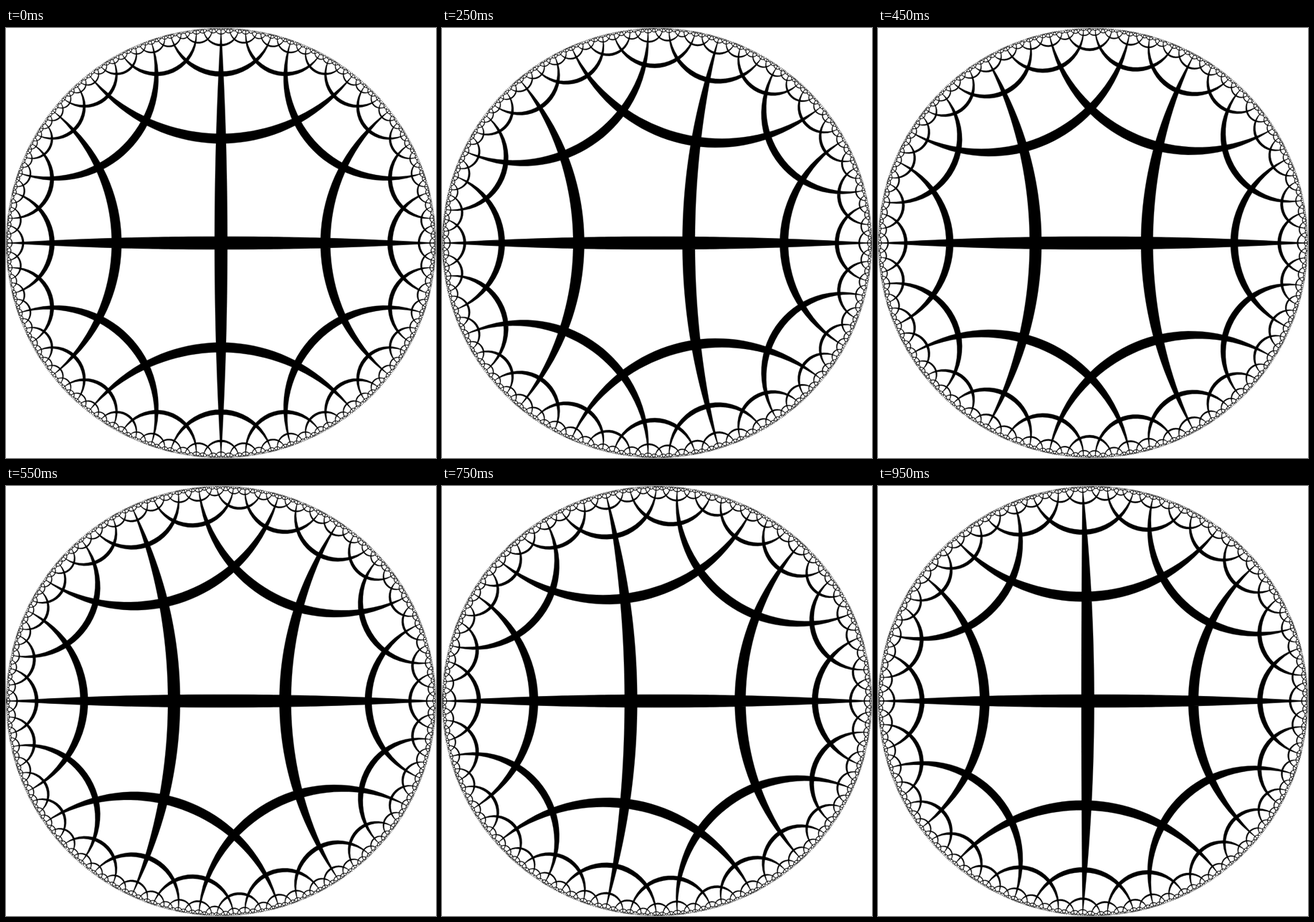
Recreate the animation shown at these times as an HTML page with a canvas. Size 600 by 600 pixels, loop 1 s.

```html
<!DOCTYPE html>
<html>
<head>
<meta charset="utf-8">
<style>
  html, body { margin: 0; width: 100%; height: 100%; overflow: hidden; background: #fff; }
  canvas { display: block; }
</style>
</head>
<body>
<canvas id="disk" width="600" height="600"></canvas>
<script>
// Order-4 pentagonal tiling in the Poincaré disk, sliding by one edge per loop.
// Each line is held as its Minkowski normal [x, y, t].
const ctx = document.getElementById('disk').getContext('2d');
const R = 300, STEP = 50, STEPS = 20;
const HALF = 0.059;        // sinh of the half line width
const MAX_T = 200;         // skips arcs smaller than 1.5 px
const h = Math.acosh(Math.cos(Math.PI / 5) * Math.SQRT2);  // half an edge
const vertex = Math.tanh(h);

const dot = (a, b) => a[0] * b[0] + a[1] * b[1] - a[2] * b[2];

function tilingLines() {
  const a = Math.SQRT1_2, c = a / vertex, b = Math.hypot(a, c);
  const sides = [
    [0, -1, 0],
    [Math.cosh(h), 0, Math.sinh(h)], [-Math.cosh(h), 0, Math.sinh(h)],
    [a, b, c], [-a, b, c]
  ];
  const seen = new Set(), lines = [];
  const add = n => {
    const key = n.map(v => Math.round(v * 1000)).join();
    if (n[2] < -1e-6 || n[2] > MAX_T * 1.75 || seen.has(key)) return;
    seen.add(key);
    lines.push(n);
  };
  sides.forEach(add);
  for (let i = 0; i < lines.length; i++) {
    const n = lines[i];
    for (const s of sides) {
      const k = 2 * dot(n, s);
      add(n.map((v, j) => v - k * s[j]));
    }
  }
  return lines;
}

// Outline of the band of constant hyperbolic width around a line
function band(x, y, t) {
  const m = Math.hypot(x, y), grow = Math.sqrt(1 + HALF * HALF) / m;
  const count = 4 * Math.ceil(6 + 30 / (1 + Math.abs(t)));
  for (let i = 0; i < count; i++) {
    const angle = 2 * Math.PI * i / count;
    const sin = Math.sin(angle), cos = Math.cos(angle), off = HALF * cos;
    const w = grow * m * m + off * t + Math.abs(cos);
    const px = (grow * (x * t - y * sin) + off * x) / w;
    const py = (grow * (y * t + x * sin) + off * y) / w;
    if (i) ctx.lineTo(px * R, py * R);
    else ctx.moveTo(px * R, py * R);
  }
  ctx.closePath();
}

const lines = tilingLines();

function draw(p) {
  const shift = h - 2 * Math.atanh(vertex * (1 - p));
  const ch = Math.cosh(shift), sh = Math.sinh(shift);
  ctx.setTransform(1, 0, 0, 1, 0, 0);
  ctx.fillStyle = '#fff';
  ctx.fillRect(0, 0, 2 * R, 2 * R);
  ctx.translate(R, R);
  ctx.beginPath();
  for (const [x, y, t] of lines) {
    const t2 = t * ch + x * sh;
    if (Math.abs(t2) < MAX_T) band(x * ch + t * sh, y, t2);
  }
  ctx.fillStyle = ctx.strokeStyle = '#000';
  ctx.lineWidth = 0.4;
  ctx.lineJoin = 'round';
  ctx.fill();
  ctx.stroke();
}

let last = -1;
function tick() {
  const step = Math.floor(performance.now() / STEP) % STEPS;
  if (step !== last) draw(step / STEPS);
  last = step;
  requestAnimationFrame(tick);
}
tick();
</script>
</body>
</html>
```
